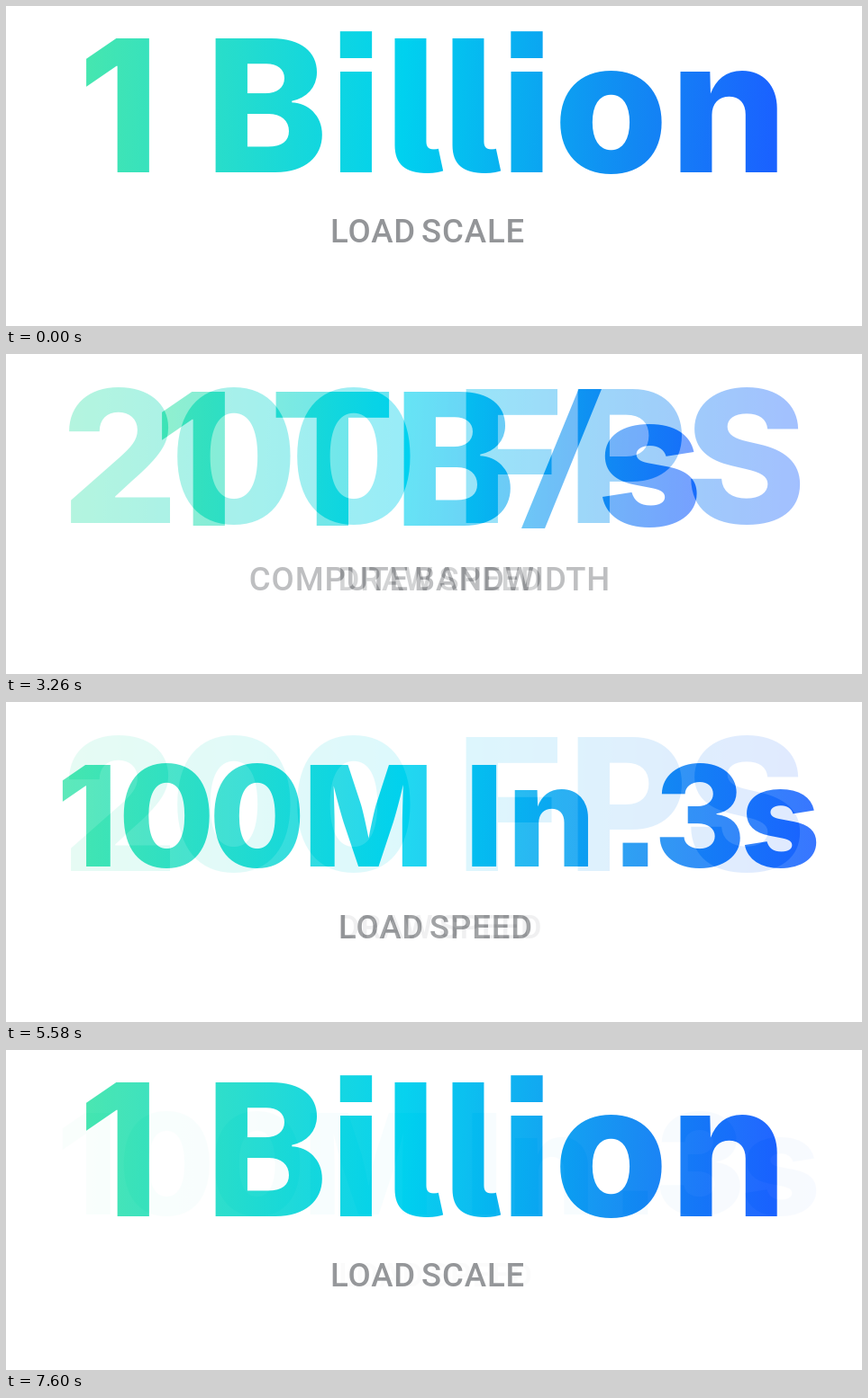
An HTML page that plays this animation: 950 px wide and 356 px high, repeating every 7.63 s.

```html
<!DOCTYPE html>
<html lang="en">
<head>
<meta charset="utf-8">
<title>Key figures</title>
<style>
  html, body { margin: 0; width: 100%; height: 100%; overflow: hidden; background: #fff; }
  svg { position: absolute; left: 0; top: 0; width: 950px; height: 356px; }
  .figure {
    font-family: Inter, sans-serif;
    font-weight: 800;
    font-optical-sizing: none;
    font-feature-settings: "cv05", "ss07"; /* tailed l, square dots */
  }
  .label {
    font: 500 36.5px Roboto, sans-serif;
    letter-spacing: .9px;
    word-spacing: -4px;
    text-anchor: middle;
    fill: #939598;
  }
</style>
</head>
<body>
<script>
const LOOP = 7630, STEP = 30, STEPS = 30;
const FADE_STARTS = [1030, 2930, 4830, 6760];

// marks: one x per visible glyph, its meaning set by anchorOf
// bar: a slanted divider, drawn as a shape in the gap of the text
const SLIDES = [
  { figure: '1 Billion', label: 'LOAD SCALE', size: 205, baseline: 185, span: [90, 851], labelX: 468,
    marks: [159, 232, 388.5, 431, 495, 578, 671.5, 748] },
  { figure: '1 TB s', label: 'COMPUTE BANDWIDTH', size: 205, baseline: 191, span: [174, 765], labelX: 470.5,
    marks: [243, 362.5, 441, 714.5], bar: 'M572 194 L635.5 39 H661 L598 194 Z' },
  { figure: '200 FPS', label: 'DRAW SPEED', size: 205, baseline: 188, span: [73, 883], labelX: 482,
    marks: [126.5, 253, 386, 510, 634, 821] },
  { figure: '100M In .3s', label: 'LOAD SPEED', size: 155.4, baseline: 183, span: [64, 898], labelX: 477,
    marks: [116, 178.5, 279, 402, 530.5, 564, 698.5, 770, 859.5] }
];
const STOPS = [[0, '#45e6b0'], [.46, '#00d1ef'], [.8, '#1288f3'], [1, '#1a62ff']];

const ruler = document.createElement('canvas').getContext('2d');

function add(parent, tag, attrs, text) {
  const node = document.createElementNS('http://www.w3.org/2000/svg', tag);
  for (const key in attrs) node.setAttribute(key, attrs[key]);
  if (text) node.textContent = text;
  return parent.appendChild(node);
}

// Stems are aligned on their own edge, everything else on the ink centre.
function anchorOf(char) {
  if (char === '1') return 1;
  return 'BFPln'.includes(char) ? 0 : .5;
}

function originFor(char, mark) {
  const box = ruler.measureText(char);
  const left = -box.actualBoundingBoxLeft;
  const width = box.actualBoundingBoxRight - left;
  return mark - left - width * anchorOf(char);
}

function glyphOrigins({ figure, marks, size }) {
  ruler.font = `800 ${size}px Inter, sans-serif`;
  let used = 0, x = 0;
  return [...figure].map(char => {
    if (char !== ' ') x = originFor(char, marks[used++]);
    return x.toFixed(2);
  }).join(' ');
}

function buildSlide(slide, index) {
  const svg = add(document.body, 'svg', { viewBox: '0 0 950 356' });
  const [x1, x2] = slide.span;
  const fill = `url(#tint${index})`;
  const gradient = add(svg, 'linearGradient', {
    id: 'tint' + index, gradientUnits: 'userSpaceOnUse', x1, x2, y1: 98, y2: 128
  });
  for (const [offset, color] of STOPS) add(gradient, 'stop', { offset, 'stop-color': color });

  add(svg, 'rect', { width: 950, height: 356, fill: '#fff' });
  add(svg, 'text', {
    class: 'figure', 'font-size': slide.size, x: glyphOrigins(slide), y: slide.baseline, fill
  }, slide.figure);
  if (slide.bar) add(svg, 'path', { d: slide.bar, fill });
  add(svg, 'text', { class: 'label', x: slide.labelX, y: 263 }, slide.label);
  return svg;
}

const layers = SLIDES.map(buildSlide);

// Opaque slides: fading the next one in on top gives a linear dissolve.
function draw() {
  const t = performance.now() % LOOP;
  const current = Math.max(0, FADE_STARTS.findLastIndex(start => t >= start));
  const next = (current + 1) % layers.length;
  const elapsed = t - FADE_STARTS[current];
  const mix = elapsed < 0 ? 0 : Math.min(1, (Math.floor(elapsed / STEP) + 1) / STEPS);

  layers.forEach((layer, i) => {
    layer.style.zIndex = i === next ? 2 : i === current ? 1 : 0;
    layer.style.opacity = i === next ? mix : i === current ? 1 : 0;
  });
  requestAnimationFrame(draw);
}
draw();
</script>
</body>
</html>
```
